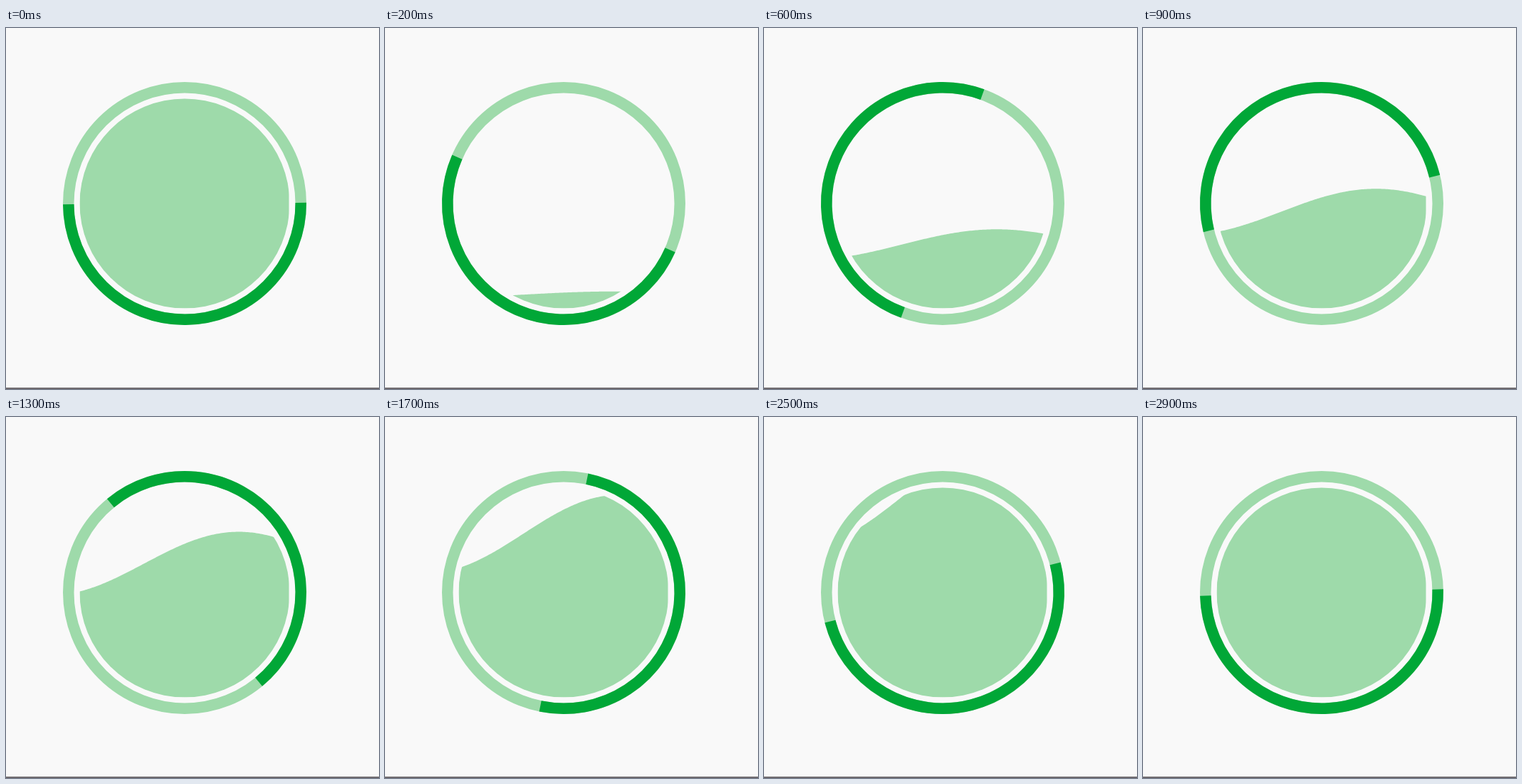
Recreate the animation shown at these times as an HTML page with a canvas. Size 524 by 508 pixels, loop 3 s.

```html
<!DOCTYPE html>
<html lang="en">
<head>
<meta charset="utf-8">
<title>Filling wave loader</title>
<style>
  html, body { margin: 0; width: 100%; height: 100%; overflow: hidden; background: #f9f9f9; }
  canvas { display: block; }
</style>
</head>
<body>
<canvas id="stage" width="524" height="508"></canvas>
<script>
const ctx = document.getElementById('stage').getContext('2d');
const LOOP = 3000, STEP = 100, DELAY = 100;
const CX = 251, CY = 247, RING = 163.25, RING_WIDTH = 15.5, BOWL = 147.5;
const LIGHT = '#9edaaa', DARK = '#01a737';

function ring(color, start, sweep) {
  ctx.beginPath();
  ctx.arc(CX, CY, RING, start, start + sweep);
  ctx.lineWidth = RING_WIDTH;
  ctx.strokeStyle = color;
  ctx.stroke();
}

// The wave rises and swells with progress.
function water(progress) {
  const left = CX - BOWL, right = CX + BOWL - 1, bottom = CY + BOWL;
  const level = bottom - 2 * BOWL * progress;
  const surface = x => level + progress * (1 - 70 * Math.cos(0.0118 * (x - 327)));
  ctx.save();
  ctx.beginPath();
  ctx.arc(CX, CY, BOWL, 0, 2 * Math.PI);
  ctx.clip();
  ctx.beginPath();
  ctx.moveTo(left, bottom);
  for (let x = left; x <= right; x += 2) ctx.lineTo(x, surface(x));
  ctx.lineTo(right, surface(right));
  ctx.lineTo(right, bottom);
  ctx.fillStyle = LIGHT;
  ctx.fill();
  ctx.restore();
}

function draw(now) {
  // Ten poses a second; the small lead absorbs timer jitter.
  const time = Math.floor((now + 8) / STEP) * STEP;
  const u = ((time - DELAY + LOOP) % LOOP) / LOOP;
  const progress = 1 - (1 - u) ** 2;

  ctx.fillStyle = '#f9f9f9';
  ctx.fillRect(0, 0, 524, 508);
  ctx.fillStyle = '#706c70';
  ctx.fillRect(0, 506, 524, 2);

  ring(LIGHT, 0, 2 * Math.PI);
  ring(DARK, progress * 2 * Math.PI, Math.PI);
  if (progress > 0) water(progress);
  requestAnimationFrame(draw);
}
draw(0);
</script>
</body>
</html>
```
